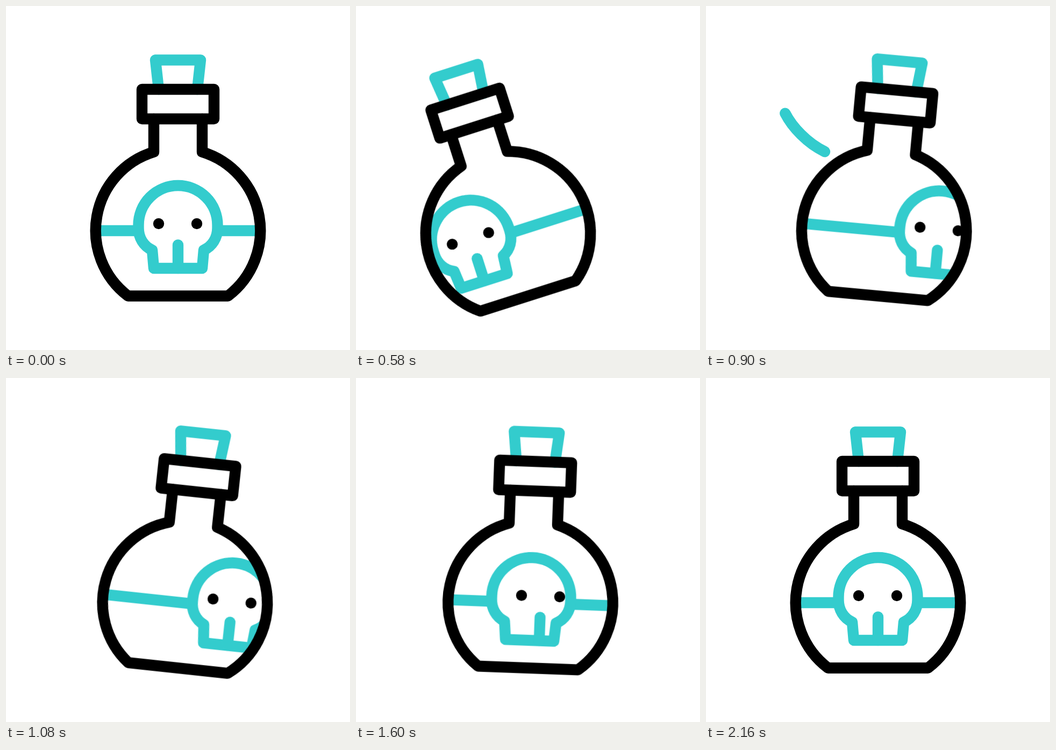
These frames come from a looping animation (640 px wide and 640 px high, 2400 ms). An HTML page:

```html
<!DOCTYPE html>
<html lang="en">
<head>
<meta charset="utf-8">
<title>Poison bottle</title>
<style>
  html, body { margin: 0; width: 100%; height: 100%; overflow: hidden; background: #fff; }
  svg { display: block; width: 100%; height: 100%; }

  .line { fill: none; stroke-width: 20.4; stroke-linecap: round; stroke-linejoin: round; }
  .teal { stroke: #33cccd; }
  .black { stroke: #000; }
  .skull { fill: #fff; }

  .bottle, .slide {
    animation: 2400ms cubic-bezier(.333, 0, .667, 1) infinite;
  }
  .bottle { transform-origin: 320px 539.5px; animation-name: rock; }
  .head { animation-name: head; }
  .face { animation-name: face; }

  @keyframes rock {
    0%, 90%, 100% { transform: rotate(0deg); }
    24.29% { transform: rotate(-17.7deg); }
    41.25% { transform: rotate(8.5deg); }
    54.87% { transform: rotate(-4.1deg); }
    67.5% { transform: rotate(2.2deg); }
  }
  @keyframes head {
    0%, 90%, 100% { transform: translateX(0); }
    24.29% { transform: translateX(-69px); }
    41.25% { transform: translateX(126px); }
    54.87% { transform: translateX(-79px); }
    67.5% { transform: translateX(2px); }
  }
  @keyframes face {
    0%, 90%, 100% { transform: translateX(0); }
    24.29% { transform: translateX(-69px); }
    41.25% { transform: translateX(126px); }
    54.87% { transform: translateX(-79px); }
    67.5% { transform: translateX(20px); }
  }

  /* A dash as long as its path runs in, fills it and runs out. */
  .swoosh { stroke-dasharray: 1 4; animation: 2400ms linear infinite; }
  .left { animation-name: sweep-left; }
  .right { animation-name: sweep-right; }

  @keyframes sweep-left {
    0%, 30.8% { stroke-dashoffset: 1.1; }
    37.5% { stroke-dashoffset: 0; }
    44.2%, 100% { stroke-dashoffset: -1.1; }
  }
  @keyframes sweep-right {
    0%, 45% { stroke-dashoffset: 1.1; }
    51.3% { stroke-dashoffset: 0; }
    58.3%, 100% { stroke-dashoffset: -1.1; }
  }
</style>
</head>
<body>
<svg viewBox="0 0 640 640">
  <defs>
    <path id="glass" d="M275 210V271.5A153 153 0 0 0 227 539.5H413A153 153 0 0 0 365 271.5V210"/>
    <clipPath id="inside"><use href="#glass"/></clipPath>
  </defs>

  <g class="bottle">
    <path class="line teal" d="M284 155L278 100.5H362L356 155"/>
    <g clip-path="url(#inside)">
      <path class="line teal" d="M167 418H473"/>
      <g class="slide head">
        <path class="line teal skull" d="M272 454C256 447 246.5 431 246.5 413V407.5A73.5 73.5 0 0 1 393.5 407.5V413C393.5 431 384 447 368 454L365 488H275Z"/>
      </g>
      <g class="slide face">
        <path class="line teal" d="M320 444.5V488"/>
        <circle cx="284" cy="405" r="10.2"/>
        <circle cx="355" cy="405" r="10.2"/>
      </g>
    </g>
    <use class="line black" href="#glass"/>
    <rect class="line black" x="253" y="155" width="134" height="55"/>
  </g>

  <path class="line teal swoosh left" pathLength="1" d="M147 199C160 225 188 255 221 271"/>
  <path class="line teal swoosh right" pathLength="1" d="M495 210C484 258 436 287 366 293.5"/>
  <path class="line teal swoosh right" pathLength="1" d="M412 342.5Q382 351 341 349.5"/>
</svg>
</body>
</html>
```
